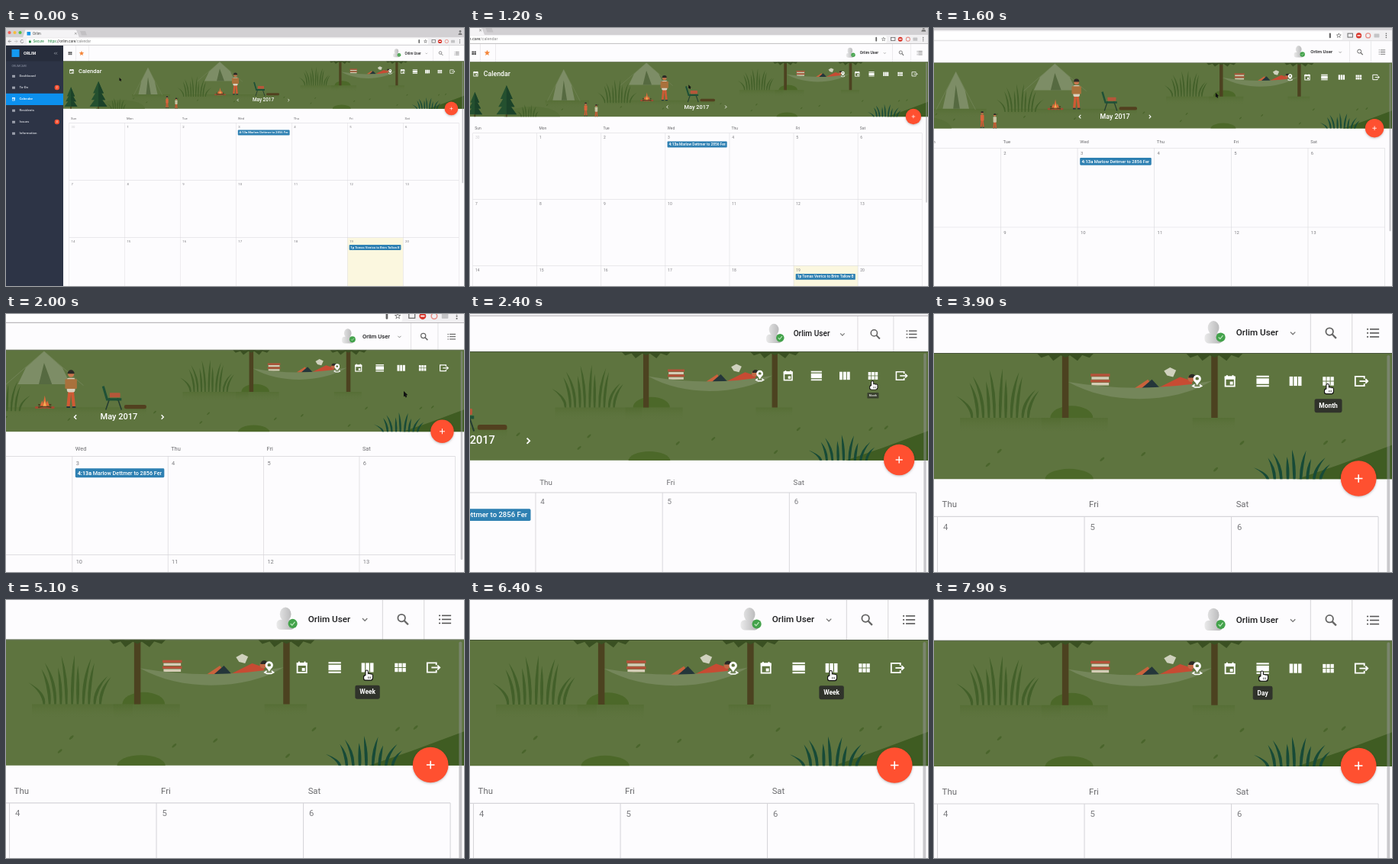
Write an HTML page with a canvas that moves like this. It is 600 px wide and 338 px high and loops after 8 s.

```html
<!DOCTYPE html>
<html lang="en">
<head>
<meta charset="utf-8">
<title>Calendar</title>
<style>
html, body { margin: 0; width: 100%; height: 100%; overflow: hidden; background: #fdfcfe; }
canvas { display: block; width: 600px; height: 338px; }
</style>
</head>
<body>
<canvas id="stage" width="600" height="338"></canvas>
<script>
const g = document.getElementById('stage').getContext('2d');
const LOOP = 8000, GREEN = '#5e743f', GRASS = '#43602a', BARK = '#4c4220';
const COL = 72.93, LEFT = 82.7, TOP = 124.3, ROW = 75.2;
const SKY = 43.4, GROUND = 75.3, EDGE = 105.7;
const clamp = v => Math.max(0, Math.min(1, v));
const ease = v => v * v * (3 - 2 * v);
const mix = (a, b, u) => a + (b - a) * u;
const times = (n, f) => { for (let i = 0; i < n; i++) f(i, n > 1 ? i / (n - 1) * 2 - 1 : 0); };

function box(x, y, w, h, c, r = 0) {
  g.fillStyle = c;
  g.beginPath();
  g.roundRect(x, y, w, h, r);
  g.fill();
}
function oval(x, y, rx, ry, c, turn = 0) {
  g.fillStyle = c;
  g.beginPath();
  g.ellipse(x, y, rx, ry, turn, 0, Math.PI * 2);
  g.fill();
}
const dot = (x, y, r, c) => oval(x, y, r, r, c);
function trace(p) {
  g.beginPath();
  for (let i = 0; i < p.length; i += 2) g.lineTo(p[i], p[i + 1]);
}
function poly(c, ...p) { trace(p); g.fillStyle = c; g.fill(); }
function line(c, w, ...p) { trace(p); g.strokeStyle = c; g.lineWidth = w; g.stroke(); }
function ring(x, y, r, c, w = .7, from = 0, to = 7) {
  g.strokeStyle = c; g.lineWidth = w;
  g.beginPath(); g.arc(x, y, r, from, to); g.stroke();
}
function mound(x, y, rx, ry, c) {
  g.fillStyle = c;
  g.beginPath();
  g.ellipse(x, y, rx, ry, 0, Math.PI, 0);
  g.fill();
}
// Chevron with its tip at x,y, pointing along (dx, dy)
function chevron(x, y, dx, dy, c, w = .7) {
  line(c, w, x - dx - dy, y - dy - dx, x, y, x - dx + dy, y - dy + dx);
}
function text(s, x, y, size, c, weight = 400, align = 'left') {
  g.font = `${weight} ${size}px Roboto, Arial, sans-serif`;
  g.textAlign = align;
  g.textBaseline = 'middle';
  g.fillStyle = c;
  g.fillText(s, x, y);
  return g.measureText(s).width;
}
function at(x, y, draw, k = 1) {
  g.save();
  g.translate(x, y);
  g.scale(k, k);
  draw();
  g.restore();
}

// Icons, drawn around 0,0 in a box of about 6 units
const tiles = (cols, rows, w, h, gap, c) => times(cols, (_, u) => times(rows, (_, v) =>
  box(u * (cols - 1) * (w + gap) / 2 - w / 2, v * (rows - 1) * (h + gap) / 2 - h / 2, w, h, c)));
const icon = {
  pin() {
    poly('#fff', -1.7, -.6, 1.7, -.6, 0, 2);
    ring(0, -1.2, 1.4, '#fff', 1.1);
    line('#fff', .6, -1.2, 1.7, -2.2, 2.4, -1, 3, 1, 3, 2.2, 2.4, 1.2, 1.7);
  },
  date(c = '#fff') {
    g.strokeStyle = c; g.lineWidth = .7;
    g.strokeRect(-2.3, -2.1, 4.6, 4.6);
    box(-2.6, -2.5, 5.2, 1.6, c, .3);
    for (const x of [-1.8, 1.1]) box(x, -3, .7, 1, c);
    box(0, .2, 1.5, 1.5, c);
  },
  day() { tiles(1, 2, 6.2, .8, 3.9, '#fff'); box(-3.1, -1.4, 6.2, 2.8, '#fff'); },
  week() { tiles(3, 1, 1.7, 4.6, .45, '#fff'); },
  month() { tiles(3, 2, 1.6, 2, .35, '#fff'); },
  leave() {
    line('#fff', .7, 1.6, -1.2, 1.6, -2.3, -2.9, -2.3, -2.9, 2.3, 1.6, 2.3, 1.6, 1.2);
    line('#fff', .7, -.8, 0, 3, 0);
    chevron(3.3, 0, 1.1, 0, '#fff');
  },
  star(c) {
    g.beginPath();
    times(10, i => {
      const a = i * Math.PI / 5 - Math.PI / 2, r = i % 2 ? 1.5 : 3.4;
      g.lineTo(Math.cos(a) * r, Math.sin(a) * r);
    });
    g.fillStyle = c; g.fill();
  }
};
const tools = ['pin', 'date', 'day', 'week', 'month', 'leave'];
const toolX = i => 503.3 + i * 16.27, TOOL_Y = 57.1;

// Separate blades that lean outward from the middle of the tuft
function grass(x, y, w, h, n, c) {
  times(n, (i, u) => {
    const b = x + u * w * .34, tip = x + u * w * .5 + (i % 2 ? 1 : -1) * w * .03;
    const top = y - h * (1 - .45 * u * u) * (i % 3 ? 1 : .8), mid = mix(y, top, .55);
    g.fillStyle = c;
    g.beginPath();
    g.moveTo(b - .5, y);
    g.quadraticCurveTo(b - 1.1, mid, tip, top);
    g.quadraticCurveTo(b + 1.3, mid, b + .5, y);
    g.fill();
  });
}
function shade(x, y, w, h) {
  const f = g.createLinearGradient(0, y, 0, y + h);
  f.addColorStop(0, 'rgba(80,106,46,.55)');
  f.addColorStop(1, 'rgba(94,116,63,0)');
  box(x, y, w, h, f);
}
function fir(x, y, w, h) {
  box(x - .8, y - 4, 1.6, 4, BARK);
  times(3, i => {
    const b = y - 3 - i * h * .25, r = w * (.5 - i * .1);
    poly('#24502f', x, b - h * .45, x + r, b, x - r, b);
    poly('#1b4229', x, b - h * .45, x + r, b, x, b);
  });
}
function tent(x, y, w, h) {
  line('#84936e', .3, x - w * .75, y + 1, x, y - h, x + w * .75, y + 1);
  poly('#7d8d66', x, y - h, x + w * .35, y - h * .5, x + w * .5, y, x - w * .5, y, x - w * .35, y - h * .5);
  poly('#566a41', x, y - h * .65, x + w * .15, y, x - w * .1, y);
}
function camper(x, y, k, shirt) {
  at(x, y, () => {
    for (const s of [-1, 1]) {
      line('#cf5a34', 2, s * .8, -11, s * 1.8, -1);
      box(s * 1.8 - 1, -1, 2.2, 1, '#26363a');
    }
    box(-2.6, -19, 5.2, 9, shirt, 1.2);
    dot(0, -21.5, 2, '#c9764d');
    mound(0, -21.7, 2.2, 2.4, '#2b2a26');
  }, k);
}
function fire(x, y) {
  times(5, (i, u) => oval(x + u * 6, y + 1.2, 1.6, 1, '#a04c32'));
  for (const s of [-1, 1]) line(BARK, 1.1, x - 5, y + s, x + 5, y - s);
  times(3, (i, u) => poly('#e06a3a', x + u * 2 - 1.6, y, x + u * 2, y - 8 + 4 * u * u, x + u * 2 + 1.6, y));
  poly('#f0b254', x - 1.2, y, x, y - 4, x + 1.2, y);
}
function chair(x, y) {
  for (const s of [-1, 1]) line('#243c31', .9, x + s * 6, y, x + s * 3, y - 9);
  line('#1f5137', 1.8, x - 8, y - 18, x - 5, y - 8, x + 6, y - 8);
  box(x - 3, y - 13, 8, 3.5, '#b5573a', .5);
}
function hammock(x0, x1) {
  const w = x1 - x0, m = (x0 + x1) / 2;
  // books
  times(4, i => box(450.4 + i % 2 * .5, 53.4 + i * 1.5, 9.6 - i % 2, 1.3, i % 2 ? '#d4cdb6' : '#b5523a'));
  // reader lying down
  poly('#c9623c', m - 2.5, 60.5, m + 4, 56.2, m + 7, 60.5);
  poly('#24363a', m + 1, 60.5, m + 6, 56.2, m + 10, 60.5);
  poly('#c74b33', m + 9, 60.5, m + 20, 55, m + 26, 57, m + 26, 60);
  dot(m + 25.5, 55.8, 1.7, '#c06a46');
  mound(m + 26, 55.4, 1.9, 1.8, '#2b2a26');
  poly('#cfd1bd', m + 12, 52, m + 15, 50.3, m + 18, 51.7, m + 16.5, 55, m + 13.5, 54.3);
  g.fillStyle = '#74865a';
  g.beginPath();
  g.moveTo(x0, 57.5);
  g.quadraticCurveTo(m, 63.5, x1, 57);
  g.bezierCurveTo(x1 - w * .25, 68, x0 + w * .3, 69.5, x0, 57.5);
  g.fill();
}
function leaves(n) {
  let seed = 7;
  const rnd = () => (seed = seed * 16807 % 2147483647) / 2147483647;
  times(n, i => oval(90 + (i + rnd()) * 510 / n, mix(80, 103, rnd()), 1.4, .55, '#4a652c', -.75));
}

function banner() {
  g.save();
  g.beginPath(); g.rect(75, SKY, 525, EDGE - SKY); g.clip();
  box(75, 43, 525, 63, GREEN);
  leaves(18);

  // left woods
  mound(150, 106, 32, 12, '#587039');
  fir(85, 106, 17, 27);
  fir(121, 106, 23, 35);
  shade(165, 87, 50, 9);
  tent(186, 87, 25, 35);
  grass(146, 106, 24, 15, 7, GRASS);
  camper(211, 105, .65, '#d9653c');
  camper(223, 106, .6, '#c9c3a2');

  // camp fire
  tent(280, 69.4, 40, 25);
  shade(235, 87, 123, 7);
  grass(247, 90, 42, 27, 10, GRASS);
  fire(280.5, 86);
  camper(300.5, 87.5, 1.2, '#d8d0bd');
  box(296, 65.5, 9, 7.5, '#a9713c', .8);
  chair(333, 89);
  box(341, 85.2, 17, 3, '#52401f', 1.4);

  // hammock between two trees
  shade(385.6, GROUND, 50, 7.5);
  grass(405.5, GROUND, 41, 24.5, 11, GRASS);
  shade(426, GROUND, 33, 8);
  mound(441, GROUND, 10.6, 6, '#4c6829');
  shade(501, GROUND, 21, 6);
  for (const x of [437.9, 511.9]) {
    box(x - 1.6, SKY, 3.2, GROUND - SKY, BARK);
    times(5, (i, u) => poly('#3a5022', x + u * 10 - 4, SKY, x + u * 12, SKY + 2 + i % 2 * 1.6, x + u * 10 + 4, SKY));
  }
  hammock(439.3, 510.4);

  // foreground
  mound(439.8, 105.8, 12, 5.2, '#4c6829');
  poly('#3f5c22', 552, 106, 574, 98.5, 600, 88.8, 600, 106);
  grass(551.5, 107, 38, 16, 9, '#174a37');
  g.restore();
  box(75, 43.1, 525, .4, '#48563b');

  at(86, 57, icon.date);
  text('Calendar', 95, 57.1, 7.6, '#fff', 500);
  text('May 2017', 337, 94.5, 6.4, '#fff', 500, 'center');
  for (const s of [-1, 1]) chevron(337 + s * 34, 94.5, s * 1.6, 0, '#fff', .8);
  tools.forEach((n, i) => at(toolX(i), TOOL_Y, icon[n]));
}

function browser() {
  box(0, 0, 600, 12.5, '#d2d0d3');
  ['#f25d56', '#f5bd3c', '#52c242'].forEach((c, i) => dot(4.5 + i * 7, 6, 2.1, c));
  poly('#f4f3f5', 22, 12.5, 25.5, 2.5, 92, 2.5, 96, 12.5);
  poly('#c2c0c3', 97, 4, 104, 4, 106, 9.5, 99, 9.5);
  box(27.5, 5, 4.6, 4.6, '#1394e8');
  text('Orlim', 35, 7.5, 4.5, '#444');
  for (const s of [-1, 1]) line('#777', .6, 90, 7.3 - s * 1.3, 92.6, 7.3 + s * 1.3);
  dot(595, 4.5, 1.4, '#777'); mound(595, 9, 2.5, 2.6, '#777');

  box(0, 12.5, 600, 10.3, '#f1f0f2');
  box(27, 13.6, 526, 8, '#fff', 1.5);
  ['#777', '#bbb'].forEach((c, i) => {
    line(c, .7, 3 + i * 8, 17.5, 7 + i * 8, 17.5);
    chevron(3 + i * 12, 17.5, i * 4 - 2, 0, c);
  });
  ring(21, 17.5, 2, '#777', .7, .3, 5.6);
  box(30, 17, 2.8, 2.4, '#218a43');
  ring(31.4, 17, 1, '#218a43', .6, Math.PI, 0);
  let x = 55;
  text('Secure', 35.5, 17.6, 4.7, '#218a43');
  for (const [s, c] of [['https', '#218a43'], ['://orlim.care', '#333'], ['/calendar', '#888']])
    x += text(s, x, 17.6, 4.7, c);

  box(540.4, 15, 1.6, 5, '#666', .8);
  at(549.5, 17.5, () => { icon.star('#666'); at(0, 0, () => icon.star('#fff'), .6); }, .8);
  g.strokeStyle = '#666'; g.lineWidth = .7; g.strokeRect(558, 15.5, 4.6, 3.6);
  dot(568.5, 17.5, 2.6, '#d8382e'); box(567, 17, 3, 1, '#fff');
  ring(577.3, 17.5, 2.2, '#e78f88', .9);
  box(583, 15.7, 5, 3.7, '#c4c4c6', .5);
  times(3, (i, u) => dot(594.5, 17.5 + u * 1.9, .6, '#666'));
  box(0, 22.4, 600, .5, '#b8b6b9');
}

function badge(n, y) {
  dot(66.8, y, 3.2, '#fa5334');
  text(n, 66.8, y + .2, 3.4, '#fff', 400, 'center');
}
function sidebar() {
  const pale = '#c5c9d2';
  box(0, 22.9, 75, 330, '#2d3446');
  box(0, 22.9, 75, 20.5, '#272d3c');
  box(7.5, 28, 10, 10, '#1499f0');
  text('ORLIM', 23, 33.2, 5.3, '#fff', 700);
  for (const x of [63.3, 65.5]) chevron(x, 33.2, -1.4, 0, pale, .6);
  text('ORLIMCARE', 7.5, 50.4, 3.6, '#8b92a3');
  box(0, 85.7, 75, 15.2, '#0c90ee');
  ['Dashboard', 'To-Do', 'Calendar', 'Residents', 'Issues', 'Information'].forEach((s, i) => {
    const y = 63.2 + i * 15, on = s === 'Calendar';
    text(s, 17.5, y, 4.4, on ? '#fff' : '#d5d8df', 500);
    at(10, y, () => on ? icon.date() : tiles(2, 2, 2.2, 1.8, .4, pale), .75);
  });
  badge('2', 78);
  badge('4', 123);
}

function topbar() {
  box(75, 22.9, 525, 20.4, '#fdfcfe');
  at(84, 33.2, () => tiles(2, 2, 2.2, 1.8, .4, '#555'));
  at(99, 33.2, () => icon.star('#f5873b'));
  for (const x of [91, 108.5, 559.4, 580]) box(x, 22.9, .4, 20.4, '#d8d7da');
  const shine = g.createLinearGradient(506, 0, 517, 0);
  shine.addColorStop(0, '#f1f1f1'); shine.addColorStop(1, '#a9a9ab');
  box(507, 33.3, 9, 5, shine, 2);
  oval(511.4, 30.6, 2.8, 3.4, shine);
  dot(515, 35.3, 2.3, '#43a24b');
  line('#b9e5ba', .5, 513.9, 35.3, 514.7, 36.1, 516.1, 34.4);
  text('Orlim User', 522.6, 33.2, 4.45, '#1d1d1f', 500);
  chevron(550.8, 33.9, 0, 1.2, '#777', .5);
  ring(569, 32.5, 1.8, '#666');
  line('#666', .9, 570.3, 33.8, 572.3, 35.8);
  times(3, (i, u) => {
    box(587.5, 32.9 + u * 1.9, .8, .6, '#555');
    box(589, 32.9 + u * 1.9, 4.6, .6, '#555');
  });
}

function entry(col, row, time, label) {
  const x = LEFT + col * COL + 2.3, y = TOP + row * ROW + 9.3;
  box(x, y, 67.8, 6.9, '#2e80b2', .8);
  g.save();
  g.beginPath(); g.rect(x, y, 65.8, 7); g.clip();
  const w = text(time + ' ', x + 1.7, y + 3.6, 4.2, '#fff', 700);
  text(label, x + 1.7 + w, y + 3.6, 4.2, '#fff', 500);
  g.restore();
}

function calendar() {
  const ink = '#d6d5d9';
  box(LEFT + 5 * COL, TOP + 2 * ROW, COL, ROW, '#fbf7df');
  times(8, i => box(LEFT + i * COL - .2, TOP, .4, 3 * ROW, ink));
  times(3, r => box(LEFT, TOP + r * ROW - .2, 7 * COL, .4, ink));
  ['Sun', 'Mon', 'Tue', 'Wed', 'Thu', 'Fri', 'Sat'].forEach((d, i) => {
    const x = LEFT + i * COL;
    text(d, x + 2.3, 118.5, 4.3, '#6b6b6e');
    times(3, r => {
      const n = r * 7 + i;
      text(n || 30, x + 2.8, TOP + r * ROW + 5.3, 4.3, n ? '#7b7b7f' : '#d0d0d3');
    });
  });
  entry(3, 0, '4:13a', 'Marlow Dettmer to 2856 Fen');
  entry(5, 2, '1p', 'Tomas Verrico to Brim Tallow Barn');
  box(597.5, 44.2, 1.5, 159, 'rgba(150,150,155,.5)', .7);
}

function fab() {
  g.save();
  g.shadowColor = 'rgba(0,0,0,.25)'; g.shadowBlur = 3; g.shadowOffsetY = 1;
  dot(583.4, 105.4, 8.85, '#ff5030');
  g.restore();
  box(581.4, 105.1, 4, .6, '#fff');
  box(583.1, 103.4, .6, 4, '#fff');
}

// The pointer crosses the page, then rests on Month, Week and Day in turn
const ARRIVE = 2280, STAY = 2360, MOVE = 320;
const stops = ['Month', 'Week', 'Day'];

function tooltips(t) {
  stops.forEach((s, i) => {
    const from = ARRIVE + i * STAY;
    const k = Math.min(clamp((t - from) / 250), clamp((from + STAY - MOVE + 120 - t) / 120));
    if (!k) return;
    at(toolX(4 - i), mix(67.7, 69.3, k), () => {
      g.globalAlpha = Math.min(1, k * 1.6);
      g.font = '700 3.2px Roboto, Arial, sans-serif';
      const w = g.measureText(s).width + 4.4;
      box(-w / 2, -3.4, w, 6.8, '#30332b', .9);
      text(s, 0, .1, 3.2, '#fff', 700, 'center');
    }, k);
  });
}

function place(t) {
  if (t < 2000) {
    const u = (t / 2000) ** 1.6;
    return [mix(148.5, 554, u), mix(65, 74.7, u)];
  }
  const first = toolX(4) - .4;
  if (t < ARRIVE) {
    const u = (t - 2000) / (ARRIVE - 2000);
    return [mix(554, first, u), mix(74.7, 61, u)];
  }
  const n = (t - ARRIVE) / STAY, i = Math.floor(n);
  const u = ease(clamp(((n - i) * STAY - STAY + MOVE) / MOVE));
  return [first - Math.min(2, i + u) * 16.27, mix(61, 58.6, clamp((t - ARRIVE) / 400))];
}

function arrow() {
  line('#111', 1, .9, 2.6, 2, 4.7);
  poly('#111', 0, 0, 0, 4.2, 3, 3);
}
function hand() {
  for (const [c, e] of [['#111', .4], ['#fff', 0]]) {
    box(-.4 - e, -e, .9 + 2 * e, 3 + 2 * e, c, .45 + e);
    times(3, i => box(.5 + i * .75 - e, 1.6 + i * .15 - e, .8 + 2 * e, 2 + 2 * e, c, .4 + e));
    box(-1.3 - e, 2.5 - e, 4 + 2 * e, 2.1 + 2 * e, c, 1);
  }
  times(3, i => line('#111', .2, .7 + i * .6, 3, .7 + i * .6, 4));
}

function draw(t) {
  // The visible width shrinks evenly, anchored to the right edge
  const s = 600 / mix(600, 227.3, clamp((t - 830) / 1739));
  g.setTransform(s, 0, 0, s, 600 * (1 - s), 39.2 * (1 - s) + (s > 1 ? t * .0004 : 0));
  box(0, -5, 600, 360, '#fdfcfe');
  browser();
  topbar();
  banner();
  calendar();
  sidebar();
  fab();
  tooltips(t);
  at(...place(t), t < 2200 ? arrow : hand);
}

const start = performance.now();
function tick(now) {
  draw(Math.max(0, now - start) % LOOP);
  requestAnimationFrame(tick);
}
draw(0);
requestAnimationFrame(tick);
</script>
</body>
</html>
```
